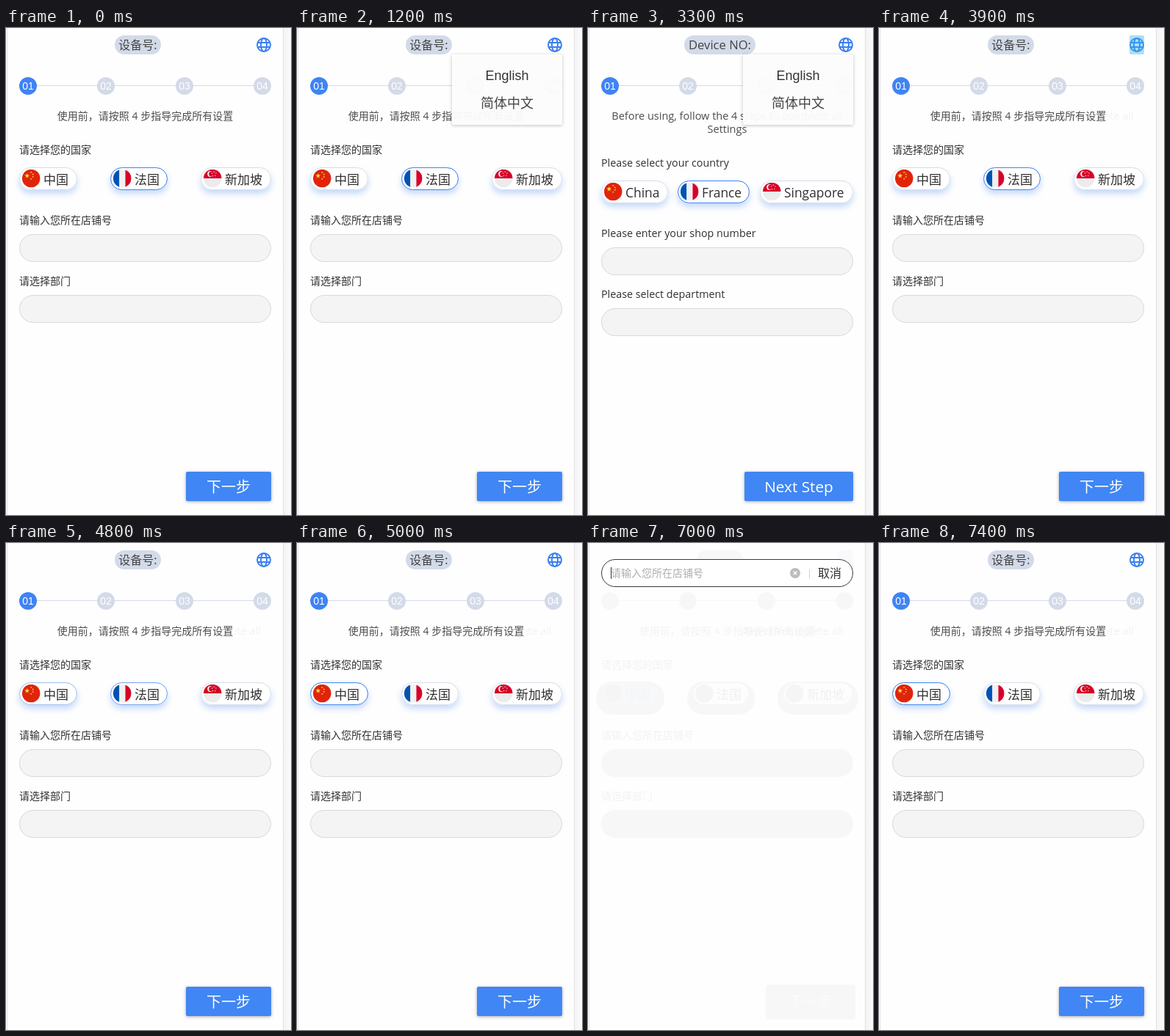
An HTML page with a canvas for the animation above (8 s loop, 388x664 px).

```html
<!DOCTYPE html>
<html lang="zh-CN">
<head>
<meta charset="utf-8">
<title>设备设置</title>
<style>
html, body { margin: 0; width: 100%; height: 100%; overflow: hidden; background: #fff; }
canvas { display: block; }
</style>
</head>
<body>
<canvas id="stage" width="388" height="664"></canvas>
<script>
const ctx = document.getElementById('stage').getContext('2d');
const LOOP = 8000;
const SANS = '"Open Sans", "Noto Sans CJK SC", "Noto Sans CJK", sans-serif';
const ARIAL = '"Liberation Sans", Arial, sans-serif';
const BLUE = '#4086f4', MUTED = '#d3dae8', GHOST = '#f7f7f7';
const STEP_X = [30, 136, 243, 349];

// Cards are [name, left, width]; dy is the shift below the intro text.
const LANG = {
  zh: {
    device: '设备号:', deviceSize: 16, deviceBox: [148, 63],
    intro: ['使用前，请按照 4 步指导完成所有设置'], introSize: 14,
    labels: ['请选择您的国家', '请输入您所在店铺号', '请选择部门'], labelSize: 14,
    cards: [['中国', 18, 79], ['法国', 142, 78], ['新加坡', 265, 96]], cardSize: 17,
    next: '下一步', nextSize: 20, nextBox: [245, 116], dy: 0
  },
  en: {
    device: 'Device NO:', deviceSize: 16.6, deviceBox: [131, 97],
    intro: ['Before using, follow the 4 steps to complete all', 'Settings'], introSize: 14.5,
    labels: ['Please select your country', 'Please enter your shop number', 'Please select department'], labelSize: 14.3,
    cards: [['China', 18, 91], ['France', 122, 98], ['Singapore', 234, 127]], cardSize: 17.4,
    next: 'Next Step', nextSize: 20.8, nextBox: [213, 148], dy: 18
  }
};

function text(str, x, y, size, color, align = 'left', family = SANS) {
  ctx.font = `${size}px ${family}`;
  ctx.textAlign = align;
  ctx.fillStyle = color;
  ctx.fillText(str, x, y);
}

function box(x, y, w, h, r, fill, border, shadow) {
  ctx.save();
  if (shadow) [ctx.shadowColor, ctx.shadowOffsetY, ctx.shadowBlur] = shadow;
  ctx.beginPath();
  ctx.roundRect(x, y, w, h, r);
  ctx.fillStyle = fill;
  ctx.fill();
  ctx.restore();
  if (border) outline(x, y, w, h, r, border);
}

function outline(x, y, w, h, r, color) {
  ctx.beginPath();
  ctx.roundRect(x + .5, y + .5, w - 1, h - 1, r - .5);
  ctx.strokeStyle = color;
  ctx.lineWidth = 1;
  ctx.stroke();
}

function disc(x, y, r, fill) {
  ctx.beginPath();
  ctx.arc(x, y, r, 0, Math.PI * 2);
  ctx.fillStyle = fill;
  ctx.fill();
}

function line(x1, y1, x2, y2, color, width = 1) {
  ctx.beginPath();
  ctx.moveTo(x1, y1);
  ctx.lineTo(x2, y2);
  ctx.strokeStyle = color;
  ctx.lineWidth = width;
  ctx.stroke();
}

function star(x, y, r, color) {
  ctx.beginPath();
  for (let i = 0; i < 10; i++) {
    const a = i * Math.PI / 5 - Math.PI / 2, d = i % 2 ? r * .4 : r;
    ctx.lineTo(x + d * Math.cos(a), y + d * Math.sin(a));
  }
  ctx.fillStyle = color;
  ctx.fill();
}

function flag(index, x, y) {
  const r = 12.3;
  const rect = (dx, dy, w, h, color) => { ctx.fillStyle = color; ctx.fillRect(x + dx, y + dy, w, h); };
  ctx.save();
  ctx.beginPath();
  ctx.arc(x, y, r, 0, Math.PI * 2);
  ctx.clip();
  if (index === 0) {
    rect(-r, -r, 25, 25, '#e0240c');
    star(x - 5.5, y - 3.5, 3.6, '#ffda44');
    for (const [dx, dy] of [[0, -8], [2.5, -5.5], [2.5, -2], [0, .8]]) star(x + dx, y + dy, 1.4, '#ffda44');
  } else if (index === 1) {
    rect(-r, -r, 25, 25, '#f0f0f0');
    rect(-r, -r, 8.2, 25, '#0052b4');
    rect(4.3, -r, 8.2, 25, '#d80027');
  } else {
    rect(-r, -r, 25, 25, '#ececec');
    rect(-r, -r, 25, r, '#d80027');
    disc(x - 3, y - 6, 4, '#f0f0f0');
    disc(x - 1.4, y - 6, 3.6, '#d80027');
    for (let i = 0; i < 5; i++) {
      const a = i * Math.PI * .4 - Math.PI / 2;
      star(x + 2 + 2.8 * Math.cos(a), y - 6 + 2.8 * Math.sin(a), 1.1, '#f0f0f0');
    }
  }
  ctx.restore();
}

function globe(x, y) {
  ctx.strokeStyle = '#3b7ff0';
  ctx.lineWidth = 2;
  for (const rx of [9, 4]) {
    ctx.beginPath();
    ctx.ellipse(x, y, rx, 9, 0, 0, Math.PI * 2);
    ctx.stroke();
  }
  for (const dy of [-3, 3]) line(x - 8.4, y + dy, x + 8.4, y + dy, '#3b7ff0', 2);
}

function background() {
  ctx.fillStyle = '#fff';
  ctx.fillRect(0, 0, 388, 664);
  const side = ctx.createLinearGradient(378, 0, 388, 0);
  side.addColorStop(0, '#f3f3f3');
  side.addColorStop(1, '#fbfbfb');
  ctx.fillStyle = side;
  ctx.fillRect(378, 0, 10, 664);
  ctx.fillStyle = '#fefefe';
  ctx.fillRect(2, 0, 375, 664);
  line(1.5, 0, 1.5, 664, '#e2e2e2');
  line(377.5, 0, 377.5, 664, '#e2e2e2');
}

// Faint leftover of the English intro, from the given x to the right edge.
function residue(left) {
  ctx.save();
  ctx.beginPath();
  ctx.rect(left, 108, 361 - left, 24);
  ctx.clip();
  text(LANG.en.intro[0], 189.5, 125, LANG.en.introSize, '#f2f2f2', 'center');
  ctx.restore();
}

function form(lang, franceOn, chinaOn) {
  const { dy, deviceBox: [dx, dw], nextBox: [nx, nw] } = lang;
  box(dx, 10, dw, 26, 13, MUTED);
  text(lang.device, dx + dw / 2, 29.3, lang.deviceSize, '#444', 'center');
  globe(351, 23);

  line(30, 78.5, 349, 78.5, MUTED);
  STEP_X.forEach((x, i) => {
    disc(x, 79, 12, i ? MUTED : '#3f83f5');
    text('0' + (i + 1), x, 84, 14, '#fff', 'center', ARIAL);
  });
  lang.intro.forEach((s, i) => text(s, 189.5, 125 + 18 * i, lang.introSize, '#4c4c4c', 'center'));

  [171, 267, 350].forEach((y, i) => text(lang.labels[i], 18, y + dy, lang.labelSize, '#303030'));
  lang.cards.forEach(([name, x, w], i) => {
    const y = 190 + dy;
    box(x, y, w, 31, 15.5, '#fff', '#d9dde4', ['rgba(64,134,244,.3)', 5, 8]);
    ctx.globalAlpha = [chinaOn, franceOn, 0][i];
    outline(x, y, w, 31, 15.5, BLUE);
    ctx.globalAlpha = 1;
    flag(i, x + 16.2, y + 15);
    text(name, x + 33, y + 23, lang.cardSize, '#303030');
  });
  for (const y of [281, 364]) box(18, y + dy, 343, 38, 19, '#f4f4f4', '#dadada');

  box(nx, 605, nw, 40, 2, BLUE, null, ['rgba(0,0,0,.32)', 1, 4]);
  text(lang.next, nx + nw / 2, 632.6, lang.nextSize, '#fff', 'center');
}

function menu(alpha) {
  ctx.save();
  ctx.globalAlpha = alpha * .95;
  box(211, 36, 150, 96, 2, '#fff', null, ['rgba(0,0,0,.25)', 1, 4]);
  ctx.globalAlpha = alpha;
  text('English', 286, 71, 18, '#333', 'center', ARIAL);
  text('简体中文', 286, 109, 18, '#444', 'center');
  ctx.restore();
}

function search(caretOn) {
  const zh = LANG.zh;
  box(148, 10, 63, 26, 13, GHOST);
  box(341, 10, 20, 26, 2, '#f9f9fd');
  line(30, 78.5, 349, 78.5, GHOST);
  for (const x of STEP_X) disc(x, 79, 12, GHOST);
  text(zh.intro[0], 189.5, 125, 14, '#f3f3f3', 'center');
  residue(211);
  [171, 267, 350].forEach((y, i) => text(zh.labels[i], 18, y, 14, '#f2f2f2'));
  zh.cards.forEach(([name, x, w], i) => {
    box(x - 7, 189, w + 14, 45, 22, GHOST);
    box(x + 2, 191, w - 4, 29, 14.5, i ? '#fdfdfd' : '#f6f8fa');
    disc(x + 16.2, 205, 12.3, '#f5f5f5');
    text(name, x + 33, 213, 17, i ? '#f0f0f0' : '#f3f5f7');
  });
  for (const y of [281, 364]) box(18, y, 343, 38, 19, GHOST);
  box(242, 602, 122, 48, 4, GHOST);
  text(zh.next, 303, 632.6, 20, '#fbfbfb', 'center');

  box(18, 22, 343, 38, 19, '#fff', '#3a3a3a');
  text('请输入您所在店铺号', 31, 46, 14, '#adadad');
  if (caretOn) line(31.5, 33, 31.5, 49, '#333');
  disc(282, 41, 7, '#bdbdbd');
  line(279.7, 38.7, 284.3, 43.3, '#fff', 1.4);
  line(284.3, 38.7, 279.7, 43.3, '#fff', 1.4);
  line(301.5, 36, 301.5, 48, '#d8cbc4');
  text('取消', 313, 47, 16, '#333');
}

// Short fades advance in three 100 ms steps.
function fade(t, start) {
  return t < start ? 0 : [.35, .8, 1][Math.min(2, Math.floor((t - start) / 100))];
}

function draw(t) {
  const within = (from, to) => t >= from && t < to;
  background();
  if (within(6100, 7400)) return search(!within(6500, 7000));

  if (t >= 3900) residue(311);
  const china = fade(t, 4800);
  form(within(2400, 3900) ? LANG.en : LANG.zh, 1 - china, china);
  if (within(1000, 1200) || within(2400, 2500) || within(3100, 3300) || within(3900, 4000)) {
    box(341, 10, 20, 26, 2, 'rgba(51,181,229,.4)');
  }
  if (within(1000, 2400)) menu(fade(t, 1000));
  if (within(3100, 3900)) menu(fade(t, 3100));
}

function tick() {
  draw(performance.now() % LOOP);
  requestAnimationFrame(tick);
}
tick();
</script>
</body>
</html>
```
